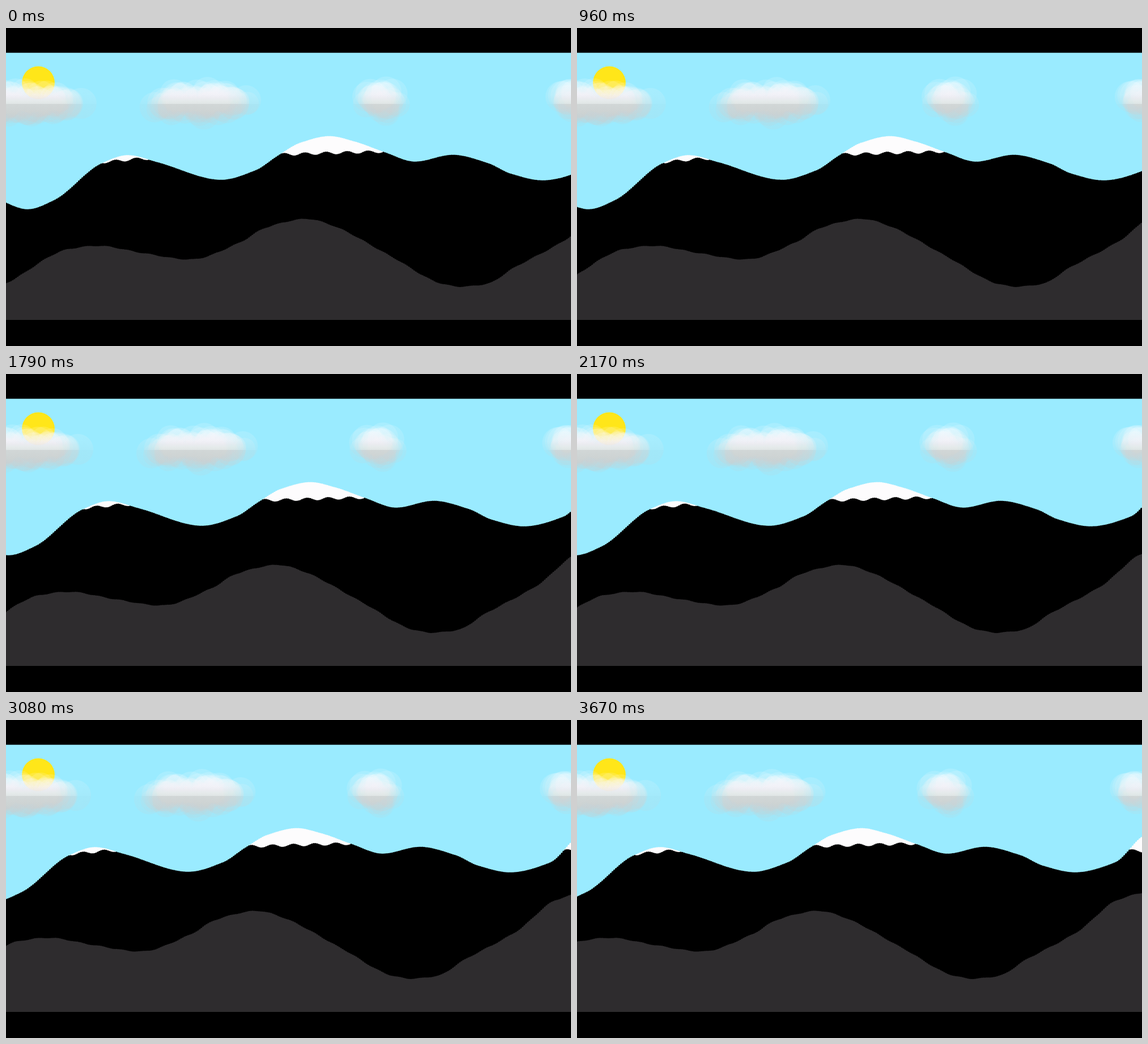
An HTML page with a canvas for the animation above (3710 ms loop, 997 by 561 pixels).

```html
<!DOCTYPE html>
<html lang="en">
<head>
<meta charset="utf-8">
<title>Mountains</title>
<style>
  html, body { margin: 0; width: 100%; height: 100%; overflow: hidden; background: #000; }
  canvas { display: block; }
</style>
</head>
<body>
<canvas id="stage" width="997" height="561"></canvas>
<script>
const ctx = document.getElementById('stage').getContext('2d');
const W = 997, TOP = 43.5, BOTTOM = 515, LOOP = 3710, TAU = 2 * Math.PI;

// Monotone cubic through [x, y] key points: flat at every peak and valley
function curve(...keys) {
  const slope = i => (keys[i + 1][1] - keys[i][1]) / (keys[i + 1][0] - keys[i][0]);
  const tangents = keys.map((key, i) => {
    if (i === 0 || i === keys.length - 1) return 0;
    const a = slope(i - 1), b = slope(i);
    return a * b > 0 ? 2 * a * b / (a + b) : 0;
  });
  return x => {
    const next = keys.findIndex(key => key[0] > x);
    if (next === 0) return keys[0][1];
    if (next < 0) return keys[keys.length - 1][1];
    const [x0, y0] = keys[next - 1], [x1, y1] = keys[next];
    const span = x1 - x0, t = (x - x0) / span, ease = t * t * (3 - 2 * t);
    const bend = t * (1 - t) * ((1 - t) * tangents[next - 1] - t * tangents[next]);
    return y0 + (y1 - y0) * ease + span * bend;
  };
}

const ridge = curve([-30, 300], [38, 319.5], [85, 303.5], [169, 238.5], [215, 224], [267, 236.5],
  [380, 267.5], [440, 251], [480, 225], [520, 202], [571, 190.5], [615, 200], [667, 218.5],
  [722, 235.5], [788, 223.5], [850, 238], [890, 256.5], [947, 268.5], [1018, 251], [1065, 206], [1110, 180]);

const slopes = curve([-30, 457], [110, 390], [162, 384], [240, 396.5], [325, 408], [411, 379],
  [461, 351], [532, 336.5], [570, 346], [680, 403], [770, 451], [802, 456], [851, 450.5],
  [891, 426], [991, 371], [1059, 317], [1120, 303]);
const hills = x => slopes(x) + .7 * Math.sin(x / 6);

// Wavy lower edge of the snow
const snowBase = curve([170, 236], [230, 231], [500, 222.5], [660, 218], [800, 216], [1040, 230], [1070, 231]);
const snowLine = x => snowBase(x) - 2.5 * Math.cos(TAU * (x - 230) / 37.2);

let seed = 7;
const random = () => (seed = seed * 16807 % 2147483647) / 2147483647;

// Puffs fill an ellipse; a few faint ones sit around its rim
function cloud(x, y, w, h, count) {
  const puff = (reach, alpha) => {
    const angle = random() * TAU;
    return {
      x: x + w * reach * Math.cos(angle),
      y: y + h * reach * Math.sin(angle),
      r: 20 + random() * 8,
      alpha
    };
  };
  const puffs = [];
  for (let i = 0; i < 8; i++) puffs.push(puff(1.25, .14));
  for (let i = 0; i < count; i++) puffs.push(puff(Math.sqrt(random()), .15));
  return puffs;
}

const puffs = [
  cloud(30, 133, 82, 16, 78),
  cloud(341, 132, 68, 16, 68),
  cloud(663, 130, 23, 15, 22),
  cloud(997, 128, 16, 11, 10)
].flat();

// White above, grey below, with a hard step at the waterline of the clouds
const cloudFill = ctx.createLinearGradient(0, 90, 0, 170);
for (const [stop, color] of [[0, '#fff'], [.35, '#f4f4f4'], [.55, '#e2e2e2'], [.55, '#d4d4d4'], [1, '#cacaca']]) {
  cloudFill.addColorStop(stop, color);
}

function disc(x, y, r) {
  ctx.beginPath();
  ctx.arc(x, y, r, 0, TAU);
  ctx.fill();
}

// Terrain is made of round-capped columns; a falsy height leaves a gap
function terrain(color, height) {
  ctx.strokeStyle = color;
  ctx.beginPath();
  for (let x = 0; x <= W + 3; x += 3) {
    const y = height(x);
    if (!y) continue;
    ctx.moveTo(x, y + 2);
    ctx.lineTo(x, BOTTOM + 5);
  }
  ctx.stroke();
}

function draw(ms) {
  const t = ms / 1000;
  ctx.fillStyle = '#9aebff';
  ctx.fillRect(0, TOP, W, BOTTOM - TOP);
  ctx.fillStyle = '#ffe619';
  disc(57, 96.5, 29);

  ctx.fillStyle = cloudFill;
  for (const { x, y, r, alpha } of puffs) {
    ctx.globalAlpha = alpha;
    disc(x - 3.2 * t, y, r);
  }
  ctx.globalAlpha = 1;

  const far = 18.65 * t, near = 28.4 * t;
  ctx.lineWidth = 4;
  ctx.lineCap = 'round';
  terrain('#fdfcfd', x => snowLine(x + far) > ridge(x + far) && ridge(x + far));
  terrain('#000', x => Math.max(ridge(x + far), snowLine(x + far)));
  terrain('#2e2c2e', x => hills(x + near));

  ctx.fillStyle = '#000';
  ctx.fillRect(0, 0, W, TOP);
  ctx.fillRect(0, BOTTOM, W, 561 - BOTTOM);
}

function tick() {
  draw(performance.now() % LOOP);
  requestAnimationFrame(tick);
}
tick();
</script>
</body>
</html>
```
